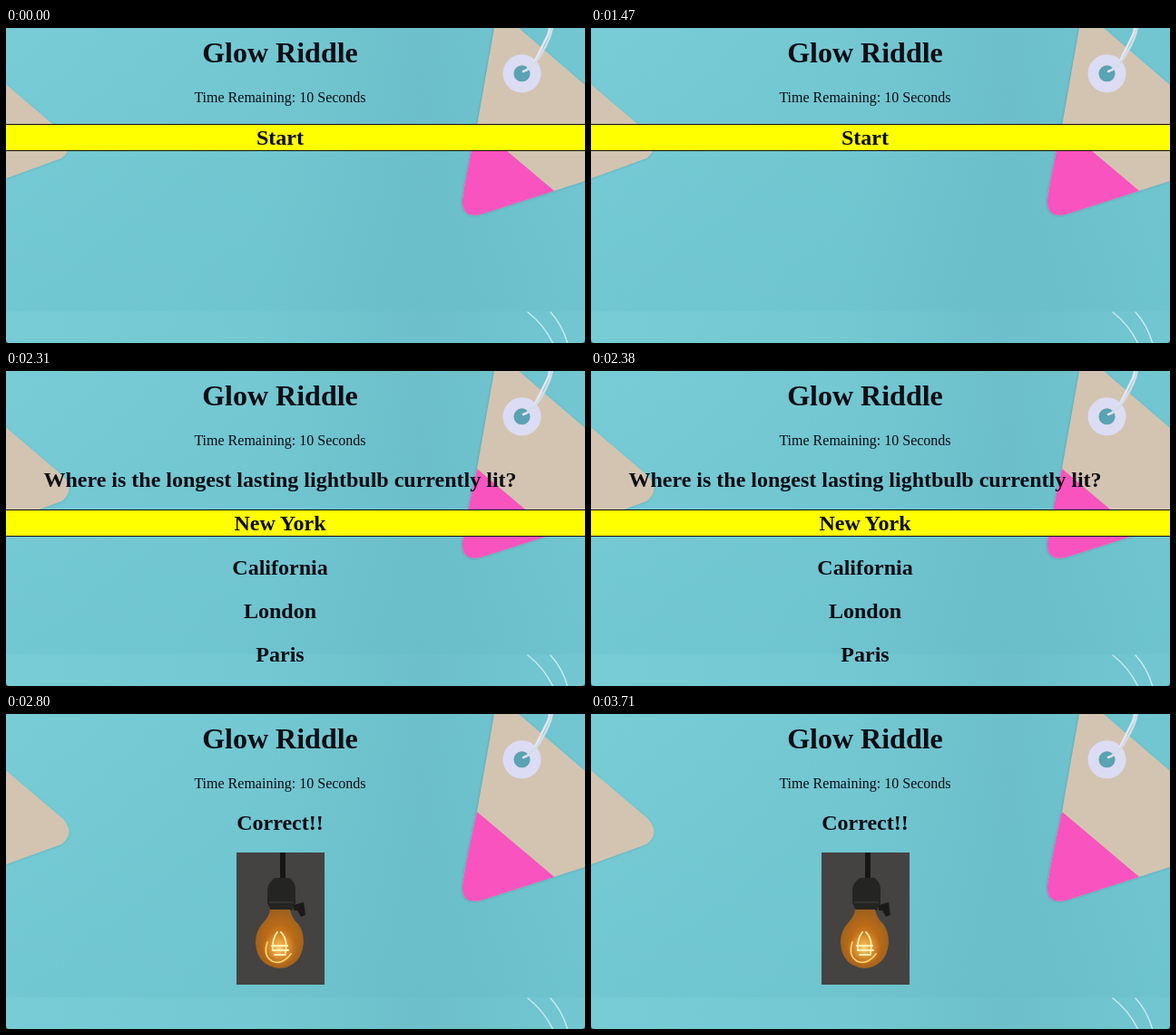
An HTML page that plays this animation: 638x348 px, repeating every 3780 ms.

```html
<!DOCTYPE html>
<html lang="en">
<head>
<meta charset="utf-8">
<title>Glow Riddle</title>
<style>
  html, body { margin: 0; width: 100%; height: 100%; overflow: hidden; }
  .stage {
    position: relative; width: 638px; height: 348px; overflow: hidden;
    background: #74c8d2; color: #0d0d14;
    font-family: "Liberation Serif", "Times New Roman", serif; text-align: center;
  }
  svg { position: absolute; left: 0; top: 0; }
  h1, p, h2 {
    position: absolute; left: 0; width: 638px; margin: 0;
    box-sizing: border-box; padding-right: 34px;
  }
  h1 { top: 9px; font-size: 32px; line-height: 37px; }
  p { top: 68px; font-size: 16px; line-height: 18px; }
  .scene {
    position: absolute; left: 0; top: 105.5px; width: 638px;
    animation: 3780ms step-end infinite;
  }
  h2 {
    position: static; margin-bottom: 19.92px; font-size: 24px; line-height: 28px;
    border: 0 solid #111;
  }
  .lit { background: #ff0; border-width: 1px 0; }
  .choice { animation: 3780ms step-end infinite; }
  .intro { animation-name: intro; }
  .ask { animation-name: ask; }
  .done { animation-name: done; }
  .first { animation-name: first; }
  .second { animation-name: second; }

  @keyframes intro {
    0% { visibility: visible; }
    46.28%, 100% { visibility: hidden; }
  }
  @keyframes ask {
    0% { visibility: hidden; }
    46.28% { visibility: visible; }
    74.06%, 100% { visibility: hidden; }
  }
  @keyframes done {
    0% { visibility: hidden; }
    74.06%, 100% { visibility: visible; }
  }
  @keyframes first {
    0% { background: transparent; border-width: 0; }
    55.54% { background: #ff0; border-width: 1px 0; }
    66.65%, 100% { background: transparent; border-width: 0; }
  }
  @keyframes second {
    0% { background: transparent; border-width: 0; }
    66.65%, 100% { background: #ff0; border-width: 1px 0; }
  }
</style>
</head>
<body>
<div class="stage">
  <svg width="638" height="348" viewBox="0 0 638 348">
    <defs>
      <linearGradient id="wall" x2="1">
        <stop offset="0" stop-color="#77ccd6"/>
        <stop offset=".45" stop-color="#73c8d2"/>
        <stop offset=".72" stop-color="#6dc0cb"/>
        <stop offset="1" stop-color="#72c7d2"/>
      </linearGradient>
      <linearGradient id="shade" x2="0" y2="1">
        <stop offset="0" stop-color="#5db4c2" stop-opacity="0"/>
        <stop offset="1" stop-color="#5db4c2" stop-opacity=".2"/>
      </linearGradient>
      <filter id="soft" x="-10%" y="-10%" width="120%" height="120%">
        <feDropShadow dx="-.5" dy=".5" stdDeviation="1.2" flood-color="#2f7e8c" flood-opacity=".45"/>
      </filter>
      <clipPath id="tag">
        <path d="M538 0H565L638 63V169L523 206Q502 210 503 190Q506 167 519 108Z"/>
      </clipPath>
    </defs>
    <rect width="638" height="348" fill="url(#wall)"/>
    <rect width="638" height="313" fill="url(#shade)"/>

    <path d="M-5 58L63 116Q77 132 61 144L-5 168Z" fill="#d3c4b1" filter="url(#soft)"/>

    <g filter="url(#soft)">
      <g clip-path="url(#tag)">
        <rect x="495" width="143" height="215" fill="#d3c4b1"/>
        <path d="M490 84L519 108L603 179L640 211H490Z" fill="#f952bf"/>
      </g>
    </g>
    <circle cx="568.5" cy="50.3" r="15" fill="none" stroke="#dcdcf4" stroke-width="12"/>
    <circle cx="568.5" cy="50.3" r="9" fill="#5aa3b4"/>
    <g fill="none" stroke-linecap="round">
      <path d="M570 48Q580 45 584 34L597 8Q599 4 599 -2" stroke="#e4e7f3" stroke-width="2.5"/>
      <path d="M574 46Q586 37 590 28Q601 10 602 -2" stroke="#d3dde8" stroke-width="2.5"/>
      <path d="M575 314Q593 328 603 349M600 314Q613 328 619 349" stroke="#cdebf1" stroke-width="1.4"/>
    </g>
    <path d="M0 344Q0 348 4 348H0ZM638 344Q638 348 634 348H638Z" fill="#31555c"/>
  </svg>

  <h1>Glow Riddle</h1>
  <p>Time Remaining: 10 Seconds</p>

  <div class="scene intro"><h2 class="lit">Start</h2></div>

  <div class="scene ask">
    <h2>Where is the longest lasting lightbulb currently lit?</h2>
    <h2 class="choice first">New York</h2>
    <h2 class="choice second">California</h2>
    <h2>London</h2>
    <h2>Paris</h2>
  </div>

  <div class="scene done">
    <h2>Correct!!</h2>
    <svg width="97" height="146" viewBox="254 153 97 146" style="left:254px;top:47.5px">
      <defs>
        <radialGradient id="glass" cx=".5" cy=".55" r=".55">
          <stop offset="0" stop-color="#e08a22"/>
          <stop offset=".55" stop-color="#b96a18"/>
          <stop offset="1" stop-color="#9c611f"/>
        </radialGradient>
        <radialGradient id="glow">
          <stop offset="0" stop-color="#ffe08a" stop-opacity=".9"/>
          <stop offset="1" stop-color="#f09a2c" stop-opacity="0"/>
        </radialGradient>
      </defs>
      <rect x="254" y="153" width="97" height="146" fill="#444342"/>
      <path d="M302 153H308V182H302Z" fill="#171615"/>
      <path d="M297 181H312Q319 185 319 194V209L315 217H292L288 209V194Q289 185 297 181Z" fill="#242423"/>
      <path d="M317 211L328 208L330 222L325 224L321 217H317Z" fill="#1b1a1a"/>
      <path d="M290 208H317" stroke="#393735" stroke-width="1.5"/>
      <path d="M291 216H313Q315 226 322 232Q328 240 328 252Q326 279 301 281Q276 278 275 252Q275 240 283 231Q290 224 291 216Z" fill="url(#glass)"/>
      <circle cx="301" cy="259" r="19" fill="url(#glow)"/>
      <g fill="none" stroke="#fff0b0" stroke-width="1.8" stroke-linecap="round">
        <path d="M299 241Q293 249 294 261M303 241Q311 249 308 264"/>
        <path d="M293 256H310M294 261H311M296 266H308"/>
        <path d="M288 252Q283 267 293 273Q304 278 314 265" stroke="#ffd36b"/>
      </g>
    </svg>
  </div>
</div>
</body>
</html>
```
